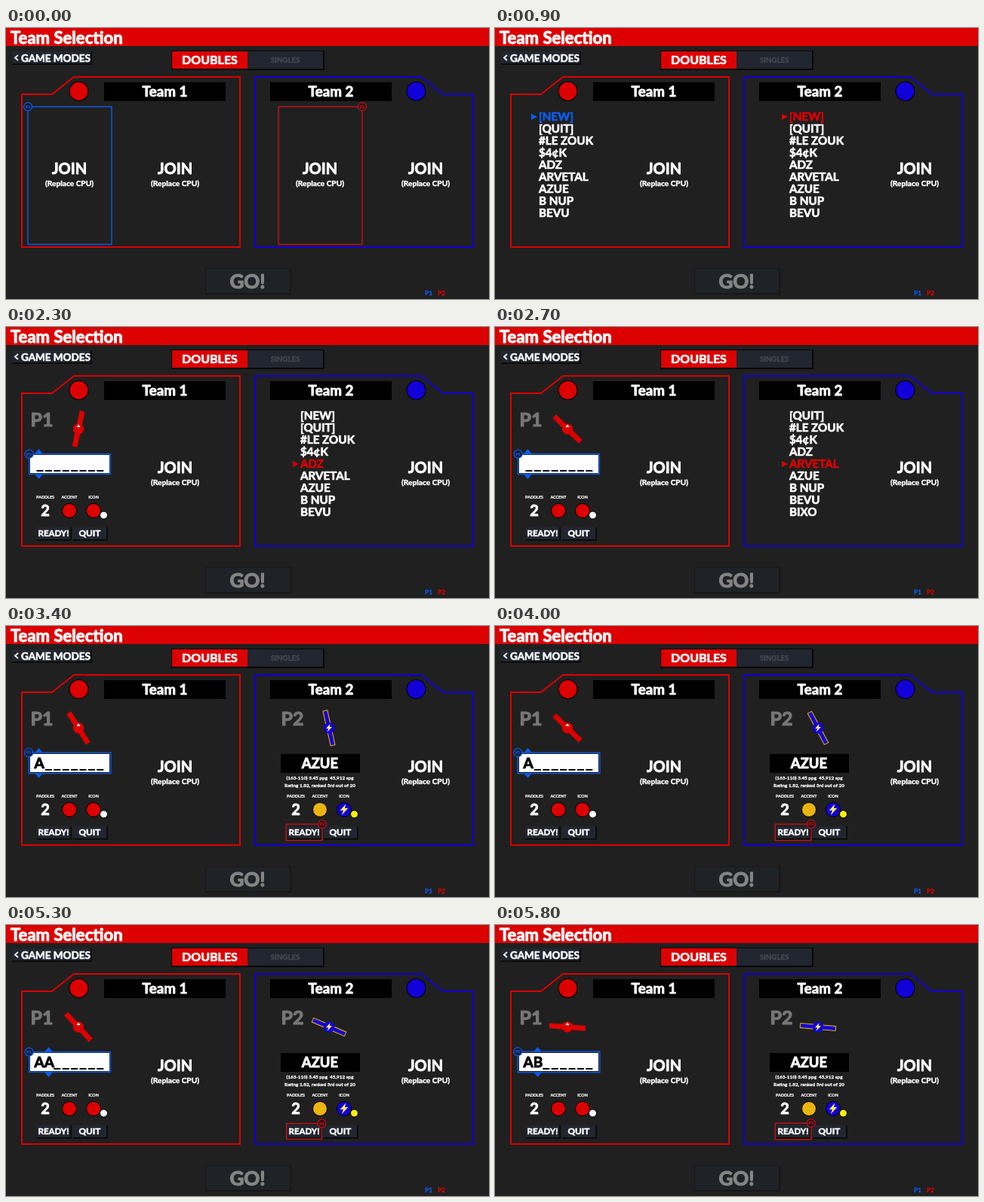
Animation of 640 by 360 pixels, one loop 5900 ms. Source, as an HTML page with a canvas:

```html
<!DOCTYPE html>
<html lang="en">
<head>
<meta charset="utf-8">
<title>Team Selection</title>
<style>
html, body { margin: 0; width: 100%; height: 100%; overflow: hidden; background: #202020; }
canvas { display: block; width: 640px; height: 360px; }
</style>
</head>
<body>
<canvas id="stage" width="640" height="360"></canvas>
<script>
const ctx = document.getElementById('stage').getContext('2d');
const LOOP = 5900, STEP = 100;
const RED = '#dd0000', BLUE = '#1200d8', CYAN = '#0c5cee', SLATE = '#222630', GOLD = '#ecb410';
const NAMES = ['[NEW]', '[QUIT]', '#LE ZOUK', '$4¢K', 'ADZ', 'ARVETAL', 'AZUE', 'B NUP', 'BEVU', 'BIXO'];
const ROWS = 9, MID_ROW = 4, SLOTS = 8, SIDE = 332;

// Times in ms
const OPEN = [700, 900], PANEL = [1800, 3300], EDIT = 2300;
const PICKS = [[0, 0], [1400, 1], [1600, 2], [2000, 3], [2300, 4], [2600, 5], [2900, 6]];
const TYPED = [[0, ''], [3300, 'A'], [5100, 'AA'], [5400, 'AB']];
const NEXT_SLOT = 4400;
const SPIN = [
  [[1800, 130], [2700, 404], [4000, 764], [4800, 990], [5800, 1264]],
  [[3300, 80], [4000, 62], [4800, 42], [5800, 5]]
];

const at = (keys, t) => keys.reduce((v, k) => t >= k[0] ? k[1] : v, keys[0][1]);

function lerp(keys, t) {
  let i = 1;
  while (i < keys.length - 1 && t > keys[i][0]) i++;
  const [t0, a] = keys[i - 1], [t1, b] = keys[i];
  return a + (b - a) * (t - t0) / (t1 - t0);
}

// A thin round stroke makes the letters heavier and softer
function text(s, x, y, size, color = '#fff', align = 'center') {
  const base = y + size * 0.36;
  ctx.font = `700 ${size}px Lato, "Open Sans", sans-serif`;
  ctx.textAlign = align;
  ctx.fillStyle = ctx.strokeStyle = color;
  ctx.lineJoin = 'round';
  ctx.lineWidth = size * 0.045;
  ctx.fillText(s, x, base);
  ctx.strokeText(s, x, base);
  ctx.lineJoin = 'miter';
}

function rect(x, y, w, h, color) {
  ctx.fillStyle = color;
  ctx.fillRect(x, y, w, h);
}

function disc(x, y, r, fill, edge = '#000', width = 1) {
  ctx.beginPath();
  ctx.arc(x, y, r, 0, 7);
  ctx.fillStyle = fill;
  ctx.fill();
  ctx.strokeStyle = edge;
  ctx.lineWidth = width;
  ctx.stroke();
}

function poly(points, fill, edge, width) {
  ctx.beginPath();
  points.forEach(([x, y]) => ctx.lineTo(x, y));
  ctx.closePath();
  if (fill) { ctx.fillStyle = fill; ctx.fill(); }
  if (edge) { ctx.strokeStyle = edge; ctx.lineWidth = width; ctx.stroke(); }
}

function button(x, y, w, h, label, size, color) {
  rect(x, y, w + 2, h + 2, '#0c0c0c');
  rect(x, y, w, h, SLATE);
  text(label, x + w / 2, y + h / 2, size, color);
}

function bolt(x, y, k) {
  poly([[2, -7], [-5, 1], [-1, 1], [-3, 7], [5, -2], [1, -2]].map(([a, b]) => [x + a * k, y + b * k]), '#fff060');
}

// Pulsing focus outline with the player tag on one corner
function focus(p, x, y, w, h, t) {
  const g = 0.9 + 0.9 * Math.cos((t - 4000) / 600 * 2 * Math.PI);
  const color = p ? '#c81018' : CYAN;
  ctx.strokeStyle = color;
  ctx.lineWidth = 1.4;
  ctx.strokeRect(x - g, y - g, w + 2 * g, h + 2 * g);
  const tx = p ? x + w + g : x - g, ty = y - g;
  disc(tx, ty, 5.5, p ? '#2a1416' : '#141c2e', color, 1.2);
  text('P' + (p + 1), tx, ty, 5.5, color);
}

function join(x) {
  text('JOIN', x, 186.5, 20);
  text('(Replace CPU)', x, 206, 10.2);
}

function list(p, t) {
  const x = p * SIDE, pick = p ? at(PICKS, t) : 0;
  const top = Math.max(0, pick - MID_ROW);
  for (let i = 0; i < ROWS; i++) {
    const y = 118 + i * 16, on = top + i === pick;
    const color = on ? (p ? RED : CYAN) : '#fff';
    text(NAMES[top + i], 58 + x, y, 15.2, color, 'left');
    if (on) poly([[48 + x, y - 4], [56 + x, y], [48 + x, y + 4]], color);
  }
}

function paddle(p, t) {
  ctx.save();
  ctx.translate(96 + p * SIDE, 135.5);
  ctx.rotate(lerp(SPIN[p], t) * Math.PI / 180);
  rect(-24, -3.5, 48, 7, p ? GOLD : RED);
  if (p) rect(-23, -2.5, 46, 5, BLUE);
  ctx.restore();
  disc(96 + p * SIDE, 135.5, 7, p ? BLUE : RED, p ? BLUE : RED, 0.5);
  if (p) bolt(428, 135.5, 0.8);
  else poly([[93.5, 133], [96, 129.5], [98.5, 133]], '#fff');
}

function nameEntry(t) {
  const typed = at(TYPED, t);
  rect(32, 170, 105, 24, '#fff');
  text(typed, 37.5, 182, 19, '#000', 'left');
  for (let i = typed.length; i < SLOTS; i++) rect(40.5 + 11.4 * i, 190, 9, 2, '#000');
  const x = t < NEXT_SLOT ? 43.5 : 56.5;
  poly([[x - 5, 168], [x, 162], [x + 5, 168]], CYAN);
  poly([[x - 5, 196], [x, 202], [x + 5, 196]], CYAN);
}

function playerPanel(p, t) {
  const x = p * SIDE;
  text('P' + (p + 1), 32.5 + x, 122.5, 25, '#777', 'left');
  paddle(p, t);
  if (!p && t >= EDIT) {
    nameEntry(t);
  } else {
    rect(32 + x, 170, 105, 25, '#000');
    text(p ? NAMES[6] : 'P1', 84 + x, 182.5, 18.5);
    if (!p) text('EDIT', 84, 196.5, 6);
  }
  if (p) {
    text('(163-110) 3.45 ppg  45,912 spg', 416, 202, 6.4);
    text('Rating 1.82, ranked 3rd out of 20', 416, 212, 6.4);
  }
  text('PADDLES', 52 + x, 226, 5.4);
  text('ACCENT', 84 + x, 226, 5.4);
  text('ICON', 116 + x, 226, 5.4);
  text('2', 52 + x, 244, 20);
  disc(84 + x, 244, 9.5, p ? GOLD : RED);
  disc(116 + x, 244, 9.5, p ? BLUE : RED);
  if (p) bolt(448, 244, 1.05);
  disc(129.5 + x, 250, 5, p ? '#f8ee10' : '#fff');
  button(41 + x, 266, 44, 16, 'READY!', 11.5);
  button(89 + x, 266, 44, 16, 'QUIT', 11.8);
  if (p) focus(1, 373, 265, 44, 18, t);
  else focus(0, 32, 170, 105, 24, t);
}

function player(p, t) {
  if (t >= PANEL[p]) return playerPanel(p, t);
  if (t >= OPEN[p]) return list(p, t);
  join(84 + p * SIDE);
  focus(p, 29.5 + p * SIDE, 105, 110, 182, t);
}

function frame(mirror, color, label) {
  const mx = x => mirror ? 640 - x : x;
  poly([[21, 291], [21, 88], [61, 88], [90, 65], [310, 65], [310, 291]].map(([x, y]) => [mx(x), y]),
    null, color, 2);
  disc(mx(96.5), 84, 12.5, color, '#000', 1.2);
  const x = mirror ? 350 : 130;
  rect(x, 72, 161, 25, '#000');
  text(label, x + 80.5, 84.5, 18.8);
}

function draw(t) {
  rect(0, 0, 640, 360, '#202020');
  rect(0, 0, 640, 24, RED);
  text('Team Selection', 6, 12.7, 22.1, '#fff', 'left');

  button(8, 31, 104, 16, '', 13);
  ctx.beginPath();
  [[16, 36], [12, 39.5], [16, 43]].forEach(([x, y]) => ctx.lineTo(x, y));
  ctx.strokeStyle = '#fff';
  ctx.lineWidth = 1.8;
  ctx.stroke();
  text('GAME MODES', 20, 39.7, 13.5, '#fff', 'left');

  rect(219, 30, 203, 26, '#080808');
  rect(220, 31, 100, 23, RED);
  rect(320, 31, 100, 23, SLATE);
  text('DOUBLES', 270, 42.5, 16);
  text('SINGLES', 370, 42.5, 9.7, '#444850');

  frame(false, RED, 'Team 1');
  frame(true, BLUE, 'Team 2');
  player(0, t);
  player(1, t);
  join(224);
  join(556);

  rect(264, 319, 114, 35, '#181818');
  rect(265, 320, 111, 32, '#1f2226');
  text('GO!', 320, 336.5, 26, '#858585');
  text('P1', 560, 352.5, 8, CYAN);
  text('P2', 577, 352.5, 8, RED);
}

const start = performance.now();
function tick() {
  const t = (performance.now() - start) % LOOP;
  draw(Math.floor(t / STEP) * STEP);
  requestAnimationFrame(tick);
}
tick();
</script>
</body>
</html>
```
